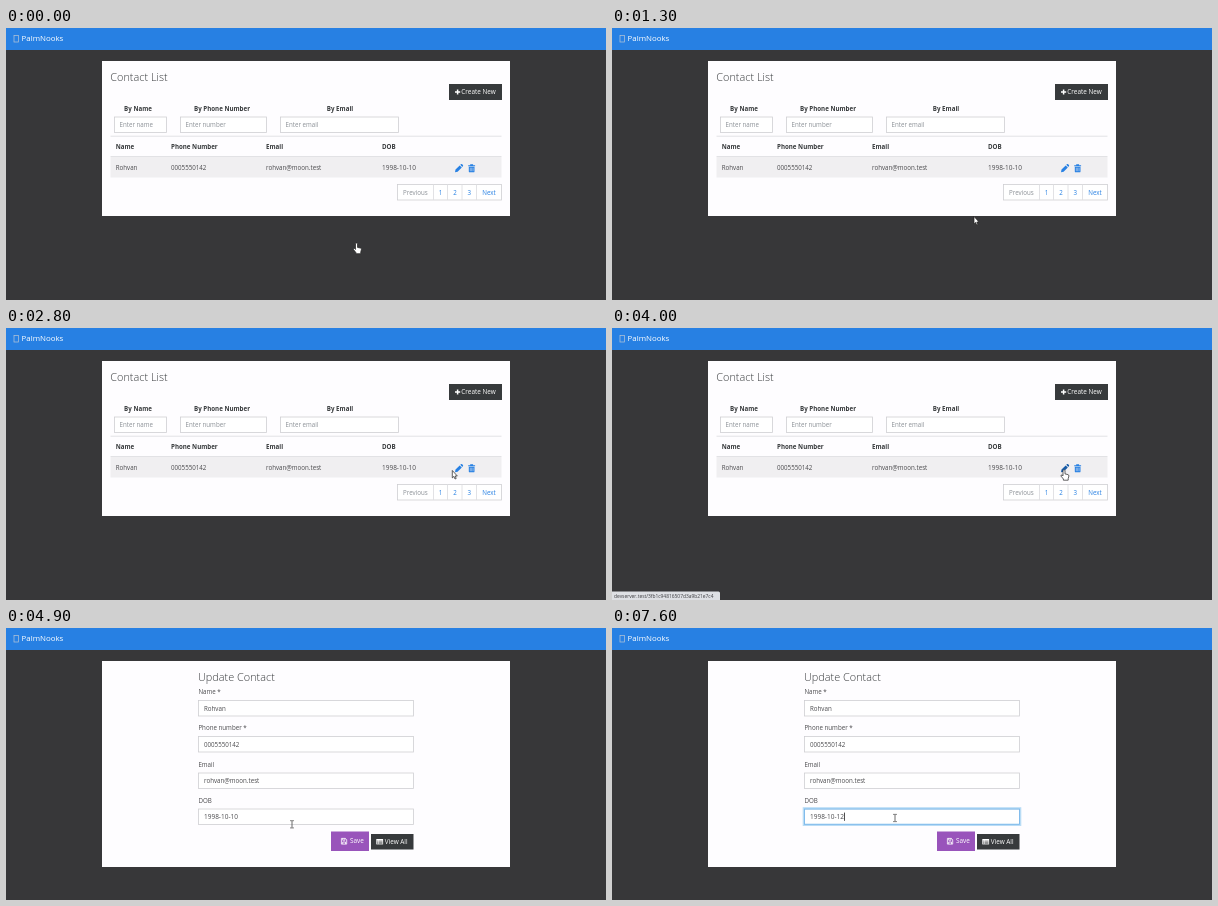
Write an HTML page that moves like this. It is 600 px wide and 272 px high and loops after 8 s.

```html
<!DOCTYPE html>
<html lang="en">
<head>
<meta charset="utf-8">
<title>Contacts</title>
<style>
  html, body { margin: 0; width: 100%; height: 100%; overflow: hidden; background: #373739; }
  svg { display: block; width: 100vw; height: 100vh; }
  text { font: 6.2px "Open Sans", "Noto Sans", sans-serif; fill: #4b4b4e; white-space: pre; }
  .bold { font-weight: 700; fill: #373a3c; }
  .title { font-size: 10.9px; font-weight: 300; fill: #373a3c; }
  .brand { font-size: 7.9px; fill: #fff; }
  .hint { fill: #8b9096; }
  .link { fill: #2780e3; }
  .light { font-size: 6.4px; fill: #fff; }
  .date { font-size: 6.5px; }
  .url { font-size: 4.9px; fill: #3c3c40; }
  .panel { fill: #fefdff; }
  .dark { fill: #373a3c; }
  .field { fill: #fff; stroke: #cfcfd3; stroke-width: .8; }
  .rule { stroke: #dfdfe3; stroke-width: .9; }
  .hand, .arrow { fill: #fff; stroke: #222; stroke-width: .7; stroke-linejoin: round; }
  .beam { fill: none; stroke: #444; stroke-width: .8; }
</style>
</head>
<body>
<svg id="stage" viewBox="0 0 600 272" preserveAspectRatio="none">
  <rect width="600" height="22" fill="#2780e3"/>
  <rect x="8" y="7.5" width="4.5" height="6.5" fill="none" stroke="#b9c6d6" stroke-width=".7"/>
  <text class="brand" x="15.5" y="13.3">PalmNooks</text>

  <g id="list">
    <rect class="panel" x="96" y="33" width="408" height="155"/>
    <rect class="dark" x="443" y="56" width="53" height="16"/>
    <path d="M449 64h5.2M451.6 61.4v5.2" stroke="#fff" stroke-width="1.5"/>
    <path class="rule" d="M104.5 108.2H495.5M104.5 128.5H495.5"/>
    <rect x="104.5" y="129" width="391" height="20.5" fill="#f0eff1"/>
    <g id="pencil" fill="#2780e3">
      <path d="M449 144.2l.5-2.6 4.2-4.2 2.1 2.1-4.2 4.2zM454.3 136.8l.8-.7q.5-.3 1 .1l.9.9q.4.5 0 1l-.7.8z"/>
    </g>
    <g fill="#2780e3">
      <path d="M462.2 137.2h2v-.9h2.9v.9h2v1h-6.9z"/>
      <path d="M462.8 138.8h5.7v4.6q0 .9-.9.9h-3.9q-.9 0-.9-.9z"/>
      <path d="M464.3 139.7v3.5M465.7 139.7v3.5M467.1 139.7v3.5" stroke="#f0eff1" stroke-width=".5"/>
    </g>
    <rect class="field" x="391.5" y="156.5" width="104" height="15.5"/>
    <path class="rule" d="M427.5 156.5v15.5M441.5 156.5v15.5M456 156.5v15.5M470.5 156.5v15.5"/>
  </g>

  <g id="form">
    <rect class="panel" x="96" y="33" width="408" height="206"/>
    <rect x="325" y="203.5" width="38" height="19.5" fill="#9954bb"/>
    <path d="M335.4 210.4h4l1.3 1.3v4.4h-5.3zM336.7 210.4v1.8h2.3v-1.8M336.7 216v-2h2.8v2" fill="none" stroke="#fff" stroke-width=".8"/>
    <rect class="dark" x="365" y="206" width="42.5" height="15.5"/>
    <rect x="370.3" y="211" width="6.8" height="5.4" fill="#fff"/>
    <path d="M371 213.1h.9m.6 0h4M371 214.4h.9m.6 0h4M371 215.6h.9m.6 0h4" stroke="#373a3c" stroke-width=".6"/>
  </g>

  <g id="status">
    <path d="M0 263.5H106.5q1.5 0 1.5 1.5V272H0z" fill="#dee0e4"/>
    <text class="url" x="2" y="269.7">devserver.test/3fb1c94816507d3a9b21e7c4</text>
  </g>

  <g id="cursor">
    <path class="hand" d="M-1 .8Q0-.6 1 .8V4.4L4 5.1Q5 5.4 4.9 6.5L4.2 9.2V10.7H-.6V9.5L-3 6.6Q-3.2 5-1.8 5.6L-1 6.4z"/>
    <path class="arrow" d="M0 0V7.4L1.6 5.9 2.7 8.5 3.9 8 2.8 5.5H5z"/>
    <path class="beam" d="M-1.8-3.6H-.5L0-3.2 .5-3.6H1.8M0-3.2V3.2M-1.8 3.6H-.5L0 3.2 .5 3.6H1.8"/>
  </g>
</svg>
<script>
const $ = id => document.getElementById(id);
const list = $('list'), form = $('form');

function add(parent, tag, attrs, content = '') {
  const el = document.createElementNS('http://www.w3.org/2000/svg', tag);
  for (const key in attrs) el.setAttribute(key, attrs[key]);
  el.textContent = content;
  return parent.appendChild(el);
}
const label = (parent, x, y, content, style = '', anchor = 'start') =>
  add(parent, 'text', { x, y, class: style, 'text-anchor': anchor }, content);
const field = (parent, x, y, width) =>
  add(parent, 'rect', { x: x + .5, y: y + .5, width: width - 1, height: 15.5, class: 'field' });

const person = { name: 'Rohvan', phone: '0005550142', email: 'rohvan@moon.test', dob: '1998-10-10' };

// Contact list
label(list, 104.3, 53, 'Contact List', 'title');
label(list, 455.3, 66.4, 'Create New', 'light');
[['By Name', 108, 53, 132, 'name'], ['By Phone Number', 174, 87, 216, 'number'], ['By Email', 274, 119, 334, 'email']]
  .forEach(([head, x, width, mid, hint]) => {
    label(list, mid, 82.8, head, 'bold', 'middle');
    field(list, x, 88.5, width);
    label(list, x + 5.5, 99.2, 'Enter ' + hint, 'hint');
  });
[['Name', 109.7, 'name'], ['Phone Number', 165, 'phone'], ['Email', 260, 'email'], ['DOB', 376, 'dob']]
  .forEach(([head, x, key]) => {
    label(list, x, 121.2, head, 'bold');
    label(list, x, 142.3, person[key], key === 'dob' ? 'date' : '');
  });
label(list, 397, 166.8, 'Previous', 'hint');
['1', '2', '3'].forEach((n, i) => label(list, 434.5 + i * 14.4, 166.8, n, 'link', 'middle'));
label(list, 483, 166.8, 'Next', 'link', 'middle');

// Update form
label(form, 192, 53, 'Update Contact', 'title');
const tops = [72, 108, 144.5, 180.5];
const values = ['Name *', 'Phone number *', 'Email', 'DOB'].map((head, i) => {
  label(form, 192.4, tops[i] - 5.8, head);
  field(form, 192, tops[i], 216);
  return label(form, 198, tops[i] + 10.7, Object.values(person)[i], i === 3 ? 'date' : '');
});
const dob = values[3];
const focus = add(form, 'g', { fill: 'none' });
add(focus, 'rect', { x: 191.8, y: 180.3, width: 216.4, height: 16.6, stroke: '#b9dcf5', 'stroke-width': 2.2 });
add(focus, 'rect', { x: 192.5, y: 181, width: 215, height: 15.3, stroke: '#7cb9ec', 'stroke-width': .9 });
const caret = add(form, 'rect', { y: 184.6, width: .8, height: 8.2, fill: '#222' });
label(form, 344, 215.4, 'Save', 'light');
label(form, 378.8, 215.8, 'View All', 'light');

// Pointer stops: time, x, y
const path = [
  [0, 350.5, 215], [200, 350.5, 215], [1100, 361, 192], [1300, 362, 188.5], [1700, 374, 178],
  [1900, 374, 178], [2800, 446.3, 142.5], [3100, 452, 141.5], [4200, 452, 141.5],
  [4800, 286, 196.3], [5100, 286, 196.3], [5200, 283, 190], [8000, 283, 190]
];
function pointer(t) {
  const i = path.findIndex(stop => stop[0] > t);
  const [t0, x0, y0] = path[i - 1], [t1, x1, y1] = path[i];
  const p = (t - t0) / (t1 - t0), e = p * p * (3 - 2 * p);
  return [x0 + (x1 - x0) * e, y0 + (y1 - y0) * e];
}

const show = (el, on) => el.setAttribute('visibility', on ? 'visible' : 'hidden');
const within = (t, from, to) => t >= from && t < to;
const [hand, arrow, beam] = $('cursor').children;

function draw(t) {
  const editing = t >= 4300;
  list.style.display = editing ? 'none' : '';
  form.style.display = editing ? '' : 'none';
  $('status').style.display = within(t, 3500, 4300) ? '' : 'none';
  $('pencil').setAttribute('fill', within(t, 3300, 4300) ? '#165ba8' : '#2780e3');

  if (editing) {
    dob.textContent = t < 6900 ? person.dob : t < 7500 ? '1998-10-1' : '1998-10-12';
    focus.setAttribute('opacity', Math.min(1, Math.max(0, (t - 5400) / 200)));
    caret.setAttribute('x', 198.2 + dob.getComputedTextLength());
    show(caret, within(t, 5500, 6000) || within(t, 6500, 7300) || t >= 7500);
  }

  const [x, y] = pointer(t);
  const overLink = t < 350 || within(t, 2900, 4300);
  const overField = editing && x > 192 && x < 408 && tops.some(top => within(y, top, top + 16.5));
  $('cursor').setAttribute('transform', `translate(${x} ${y})`);
  show(hand, overLink);
  show(beam, overField);
  show(arrow, !overLink && !overField);
}

function tick() {
  draw(performance.now() % 8000);
  requestAnimationFrame(tick);
}
tick();
</script>
</body>
</html>
```
